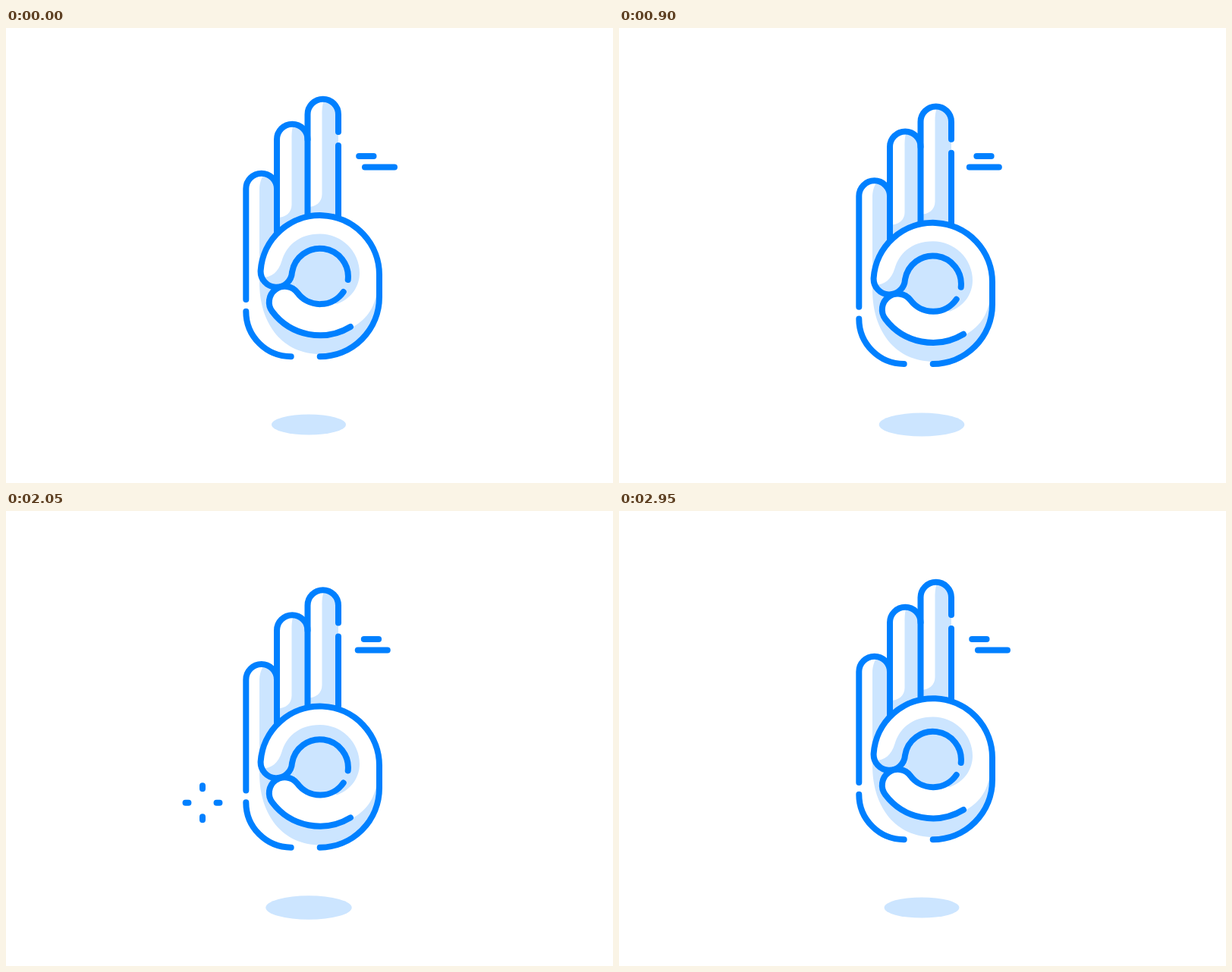
Animation, 800 px wide and 600 px high, one loop 3 s. Source, as an HTML page:

```html
<!DOCTYPE html>
<html lang="en">
<head>
<meta charset="utf-8">
<title>Floating hand</title>
<style>
html, body { margin: 0; width: 100%; height: 100%; overflow: hidden; background: #fff; }
svg { display: block; width: 100vw; height: 100vh; }
.line { fill: none; stroke: #0080ff; stroke-width: 8; stroke-linecap: round; }
.tint { fill: #cce5ff; }
.white { fill: #fff; }
</style>
</head>
<body>
<svg viewBox="0 0 800 600">
  <ellipse id="shadow" class="tint" cx="399" cy="523"/>
  <g id="hand">
    <g class="tint">
      <!-- little finger and palm -->
      <path d="M334 214C334 205 336 198 341 192A20.3 20.3 0 0 1 357 212V326H490V355A76 76 0 0 1 414 430C366 430 334 392 334 335Z"/>
      <!-- ring and middle fingers -->
      <path d="M376.5 147C376.5 138 377 131 379 127A20.3 20.3 0 0 1 397.5 147V275H357V250C368 250 376.5 244 376.5 233Z"/>
      <path d="M416.5 114C416.5 106 417 99 420 94A20.3 20.3 0 0 1 438 114V262H397.5V236C408 236 416.5 230 416.5 219Z"/>
    </g>
    <!-- index finger and thumb -->
    <path class="white" d="M335.6 320A78.3 78.3 0 0 1 492 326.8L489 346C486 370 474 386 454 396A78.3 78.3 0 0 1 351 374A20.7 20.7 0 0 1 384 349L377 322A20.7 20.7 0 0 1 335.6 320Z"/>
    <path class="tint" d="M466 323A52 52 0 0 0 414 271.5C384 271.5 369 289 363.5 307C359 322 350 329 337 329A20.7 20.7 0 0 0 377 322L384 349A37.3 37.3 0 0 0 430 360.6L436 364C455 357 466 341 466 323Z"/>
    <g class="line">
      <path d="M316.3 358V212A20.35 20.35 0 0 1 357 212"/>
      <path d="M357 270V147A20.25 20.25 0 0 1 397.5 147"/>
      <path d="M397.5 248V114A20.25 20.25 0 0 1 438 114V137M438 155V250"/>
      <path d="M450.7 332A37.2 37.2 0 0 0 377 322A20.7 20.7 0 0 1 335.6 320A78.3 78.3 0 0 1 492 326.8V355A78.3 78.3 0 0 1 413.7 433.2"/>
      <path d="M444.7 348A37.3 37.3 0 0 1 384 349A20.7 20.7 0 0 0 351 374A78.3 78.3 0 0 0 454 394"/>
      <path d="M316.3 373.7A59.5 59.5 0 0 0 375.7 433.2"/>
    </g>
  </g>
  <g class="line">
    <path id="upper" d="M465.2 169H484.5"/>
    <path id="lower" d="M473 183.4H512"/>
    <path id="burstA"/>
    <path id="burstB"/>
    <path id="diamond" stroke-linejoin="round"/>
  </g>
</svg>
<script>
const LOOP = 3000, STEP = 50;
const el = id => document.getElementById(id);
const mix = (a, b, p) => a + (b - a) * p;
const smooth = p => p * p * (3 - 2 * p);
const easeOut = p => 1 - (1 - p) ** 2;
// Rises to 1 at the peak time, back to 0 at the end of the loop
const swing = (t, peak) => t < peak ? t / peak : (LOOP - t) / (LOOP - peak);
const move = (id, x, y) => el(id).setAttribute('transform', `translate(${x} ${y})`);

// Four dashes fly outwards and shrink to dots
function burst(id, x, y, p) {
  let d = '';
  if (p > 0 && p < 1) {
    const inner = mix(13.5, 27.5, easeOut(p));
    const outer = Math.max(inner + .01, mix(13.5, 27.5, easeOut(Math.min(1, p * 2))));
    for (const [u, v] of [[1, 0], [0, 1], [-1, 0], [0, -1]])
      d += `M${x + u * inner} ${y + v * inner}L${x + u * outer} ${y + v * outer}`;
  }
  el(id).setAttribute('d', d);
}

function diamond(x, y, p) {
  const on = p >= 0 && p < 1;
  const r = on ? mix(11, 23, easeOut(p)) : 0;
  el('diamond').setAttribute('d', on ? `M${x - r} ${y}l${r} ${-r} ${r} ${r} ${-r} ${r}Z` : '');
  el('diamond').style.strokeWidth = on ? .06 + 6 * Math.sin(Math.PI * p) : 0;
}

function draw(t) {
  const p = swing(t, 1500), q = smooth(p);
  move('hand', 0, 15 * q);
  move('upper', 9.5 * q, 0);
  move('lower', -15.1 * smooth(swing(t, 1350)), 0);
  el('shadow').setAttribute('rx', mix(49, 61.2, p));
  el('shadow').setAttribute('ry', mix(13.5, 16.9, p));
  burst('burstA', 304, 140, (t - 400) / 500);
  burst('burstB', 259, 384.8, (t - 1950) / 500);
  diamond(224.3, 338.2, (t - 2400) / 450);
}

const start = performance.now();
function tick() {
  const t = (performance.now() - start) % LOOP;
  draw(Math.floor(t / STEP) * STEP);
  requestAnimationFrame(tick);
}
tick();
</script>
</body>
</html>
```
